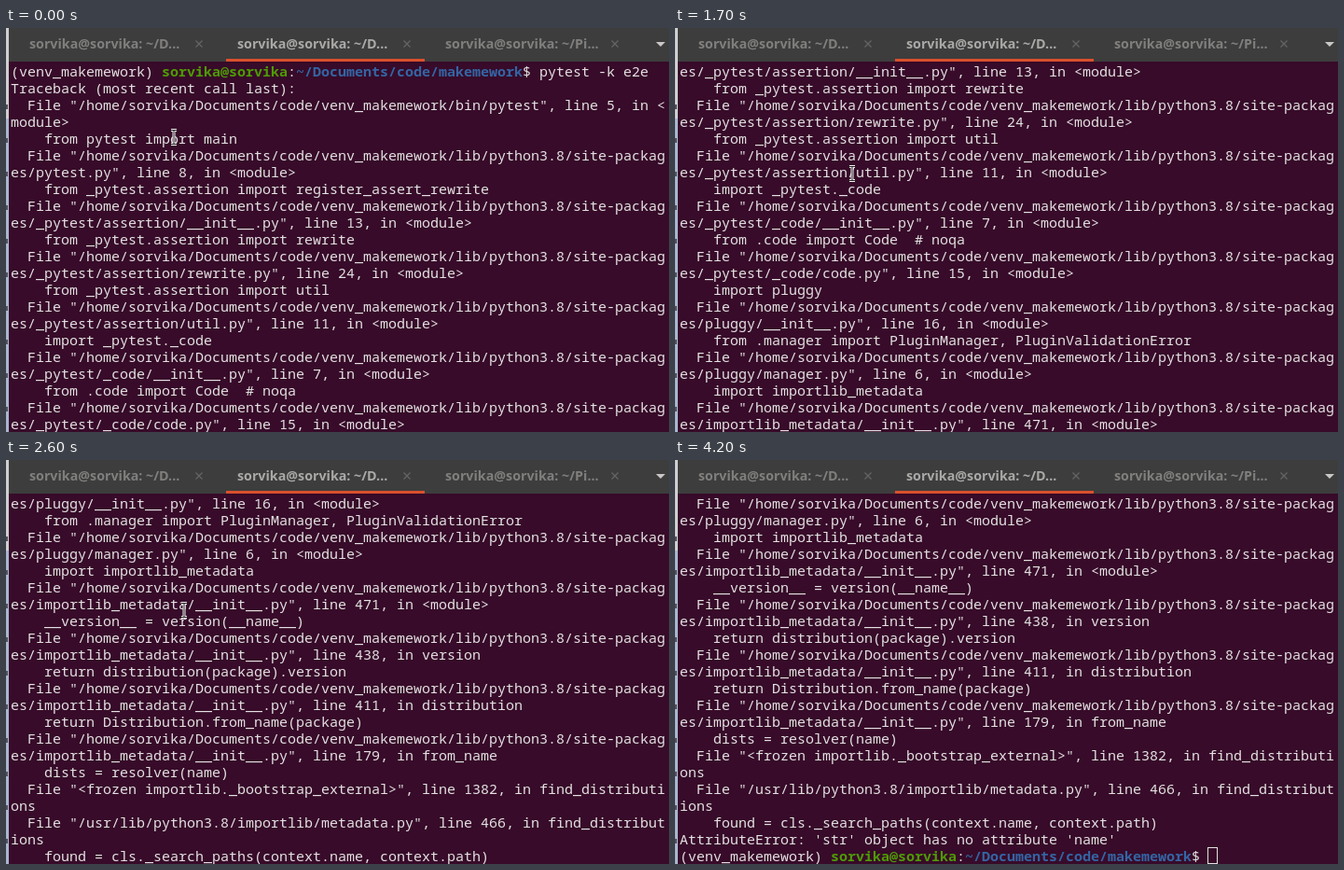
Write an HTML page with a canvas that moves like this. It is 711 px wide and 433 px high and loops after 4.8 s.

```html
<!DOCTYPE html>
<html lang="en">
<head>
<meta charset="utf-8">
<title>Terminal traceback</title>
<style>
  html, body { margin: 0; width: 100%; height: 100%; overflow: hidden; background: #370b29; }
  canvas { display: block; }
</style>
</head>
<body>
<canvas id="stage" width="711" height="433"></canvas>
<script>
const ctx = document.getElementById('stage').getContext('2d');
const W = 711, H = 433, LOOP = 4800, TICK = 100;
const COLS = 78, ROWS = 22, CELL = 9, LINE = 18, LEFT = 5, BASE = 52, BAR = 36;
const MONO = '15px "Noto Sans Mono", "DejaVu Sans Mono", monospace';
const TITLE = 'bold 14.25px "Noto Sans", "Open Sans", sans-serif';
const INK = '#e4e1e2', GREEN = '#4e9a06', BLUE = '#3465a4';

const USER = 'sorvika';
const HOST = `${USER}@${USER}`;
const VENV = `/home/${USER}/Documents/code/venv_makemework`;
const SITE = `${VENV}/lib/python3.8/site-packages`;
const META = `${SITE}/importlib_metadata/__init__.py`;

const prompt = command => [
  ['(venv_makemework) ', INK],
  [HOST, GREEN, 'bold '],
  [':', INK],
  ['~/Documents/code/makemework', BLUE, 'bold '],
  ['$ ' + command, INK]
];

function wrap(text) {
  const rows = [];
  for (let i = 0; i < text.length; i += COLS) rows.push([[text.slice(i, i + COLS), INK]]);
  return rows;
}

const trace = `Traceback (most recent call last):
  File "${VENV}/bin/pytest", line 5, in <module>
    from pytest import main
  File "${SITE}/pytest.py", line 8, in <module>
    from _pytest.assertion import register_assert_rewrite
  File "${SITE}/_pytest/assertion/__init__.py", line 13, in <module>
    from _pytest.assertion import rewrite
  File "${SITE}/_pytest/assertion/rewrite.py", line 24, in <module>
    from _pytest.assertion import util
  File "${SITE}/_pytest/assertion/util.py", line 11, in <module>
    import _pytest._code
  File "${SITE}/_pytest/_code/__init__.py", line 7, in <module>
    from .code import Code  # noqa
  File "${SITE}/_pytest/_code/code.py", line 15, in <module>
    import pluggy
  File "${SITE}/pluggy/__init__.py", line 16, in <module>
    from .manager import PluginManager, PluginValidationError
  File "${SITE}/pluggy/manager.py", line 6, in <module>
    import importlib_metadata
  File "${META}", line 471, in <module>
    __version__ = version(__name__)
  File "${META}", line 438, in version
    return distribution(package).version
  File "${META}", line 411, in distribution
    return Distribution.from_name(package)
  File "${META}", line 179, in from_name
    dists = resolver(name)
  File "<frozen importlib._bootstrap_external>", line 1382, in find_distributions
  File "/usr/lib/python3.8/importlib/metadata.py", line 466, in find_distributions
    found = cls._search_paths(context.name, context.path)
AttributeError: 'str' object has no attribute 'name'`;

const lines = [prompt('pytest -k e2e'), ...trace.split('\n').flatMap(wrap), prompt('')];
const lastTop = lines.length - ROWS;

// Spans of activity; the picture rests between them
const bursts = [[0, 0], [900, 900], [1100, 1300], [1500, 1900], [2400, 2600], [3000, 3200], [3800, 4200]];
const wheel = [900, 1100, 1300, 1800, 1900, 2400, 2500, 2600, 3000];
const path = [
  { t: 1100, x: 180, y: 117 },
  { t: 1700, x: 190, y: 156 },
  { t: 3000, x: 192, y: 163 },
  { t: 3200, x: 192, y: 172 },
  { t: 3700, x: 192, y: 172 },
  { t: 4100, x: 88, y: 25 }
];
const POINTER_GONE = 4200;

function activeTime(t) {
  const [, end] = bursts.findLast(([from]) => from <= t);
  return Math.min(Math.floor(t / TICK) * TICK, end);
}

const scrollTop = t => Math.min(3 * wheel.filter(at => at <= t).length, lastTop);

function pointerAt(t) {
  const next = path.find(p => p.t >= t) ?? path.at(-1);
  const prev = path.findLast(p => p.t < t) ?? next;
  const k = next === prev ? 1 : (t - prev.t) / (next.t - prev.t);
  return [prev.x + (next.x - prev.x) * k, prev.y + (next.y - prev.y) * k].map(Math.round);
}

function rect(x, y, w, h, color) {
  ctx.fillStyle = color;
  ctx.fillRect(x, y, w, h);
}

function write(text, x, y, color, font) {
  ctx.font = font;
  ctx.fillStyle = color;
  ctx.fillText(text, x, y);
}

function trail(...points) {
  ctx.beginPath();
  for (const [x, y] of points) ctx.lineTo(x, y);
}

function stroke(width, color) {
  ctx.lineWidth = width;
  ctx.strokeStyle = color;
  ctx.stroke();
}

function drawTab(x, folder, color) {
  write(`${HOST}: ~/${folder}...`, x, 22, color, TITLE);
  const cx = x + 182;
  for (const d of [-3.5, 3.5]) {
    trail([cx - d, 13.5], [cx + d, 20.5]);
    stroke(1.2, '#646464');
  }
}

function drawTabs() {
  rect(3, 0, W, BAR, '#3d3d3d');
  rect(236, BAR - 3, 213, 3, '#d9512d');
  drawTab(25, 'D', '#807f7d');
  drawTab(248, 'D', '#aaa9a7');
  drawTab(471, 'Pi', '#807f7d');
  trail([697, 15], [707, 15], [702, 20]);
  ctx.fillStyle = '#c9c8c6';
  ctx.fill();
}

// Sliver of the window behind
function drawEdge() {
  rect(0, 0, 3, 97, '#cfced0');
  rect(0, 97, 3, H, '#a9b6cf');
  for (let y = 82; y < H; y += 2 * LINE) rect(0, y, 2, 5, '#50525e');
}

function drawLine(parts, row) {
  let x = LEFT;
  for (const [text, color, weight = ''] of parts) {
    write(text, x, BASE + row * LINE, color, weight + MONO);
    x += text.length * CELL;
  }
}

function drawCaret() {
  ctx.strokeStyle = INK;
  ctx.lineWidth = 1;
  ctx.strokeRect(571.5, 415.5, 10, 17);
}

function drawPointer(x, y) {
  if (y < BAR) {
    trail([x, y], [x, y + 15], [x + 10, y + 10], [x, y]);
  } else {
    const top = y - 7.5, bottom = y + 7.5;
    trail([x - 3, top], [x + 3, top], [x, top], [x, bottom], [x - 3, bottom], [x + 3, bottom]);
  }
  stroke(3, '#f4f2f3');
  stroke(1, '#222');
}

function render(now) {
  const t = activeTime(now % LOOP);
  const top = scrollTop(t);
  rect(0, 0, W, H, '#370b29');
  drawEdge();
  drawTabs();
  lines.slice(top, top + ROWS).forEach(drawLine);
  if (top === lastTop) drawCaret();
  if (t < POINTER_GONE) drawPointer(...pointerAt(t));
}

let start;
function tick(now) {
  start ??= now;
  render(now - start);
  requestAnimationFrame(tick);
}
render(0);
requestAnimationFrame(tick);
</script>
</body>
</html>
```
